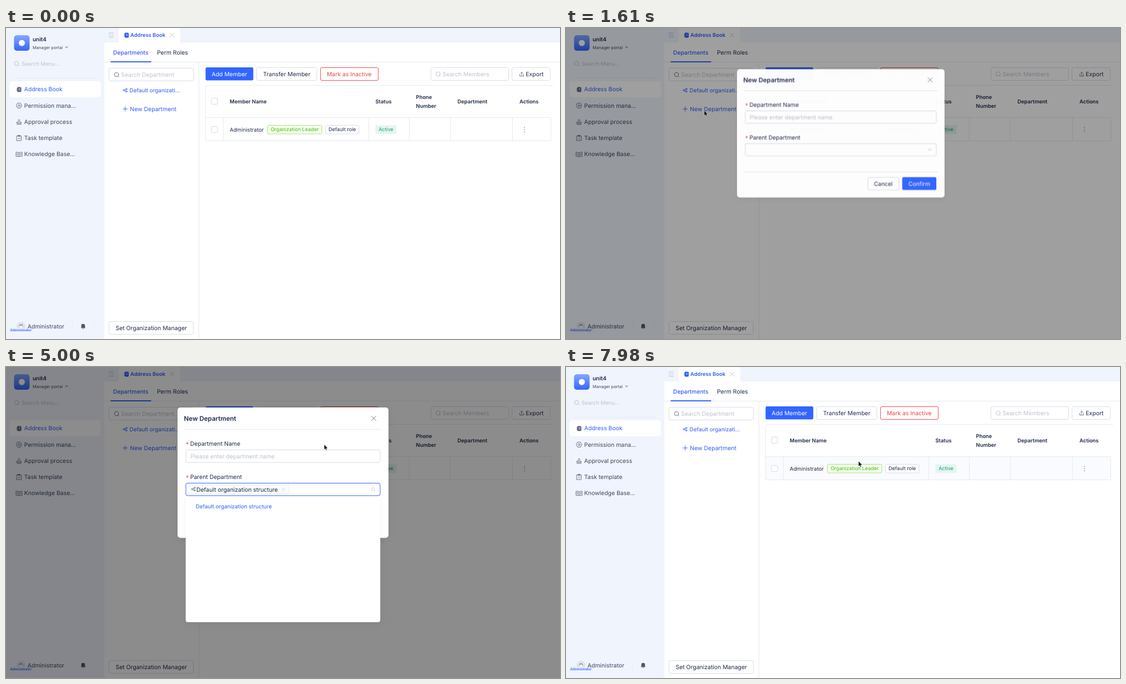
Recreate the animation shown at these times as an HTML page. Size 998x561 px, loop 8 s.

```html
<!DOCTYPE html>
<html lang="en">
<head>
<meta charset="utf-8">
<title>New department</title>
<style>
html, body { margin: 0; width: 100%; height: 100%; overflow: hidden; background: #fff; }
svg { display: block; }
text { font: 10.45px Inter, "Open Sans", sans-serif; fill: #1f2a4a; text-rendering: geometricPrecision; white-space: pre; }
.head { font-size: 9.4px; font-weight: 600; }
.small { font-size: 9.05px; }
.nav { fill: #3c4763; }
.hint { fill: #bcc2d0; }
.blue { fill: #2e5bff; }
.box { fill: #fff; stroke: #d9dde8; }
.rule { fill: none; stroke: #e7eaf1; }
.icon { fill: none; stroke: #5d677f; stroke-width: .9; stroke-linecap: round; stroke-linejoin: round; }
.icon.pale { stroke: #b4bbca; }
.icon.lit { stroke: #2e5bff; }
.star { fill: #f5403c; }

/* One loop is 8 s, so 1% is 80 ms. */
.anim { animation: 8s linear infinite; }
.step { animation: 8s step-end infinite; }

#mask { animation-name: mask; }
@keyframes mask {
  0%, 18.05% { opacity: 0; }
  20.55%, 92.44% { opacity: .45; }
  94.94%, 100% { opacity: 0; }
}
#modal { animation-name: zoom; transform-origin: 249px 149px; }
@keyframes zoom {
  0% { opacity: 0; transform: scale(.2); }
  18.59% { opacity: 0; transform: scale(.2); animation-timing-function: cubic-bezier(.08,.82,.17,1); }
  21.09% { opacity: 1; transform: none; }
  92.44% { opacity: 1; transform: none; animation-timing-function: cubic-bezier(.78,.14,.15,.86); }
  94.94%, 100% { opacity: 0; transform: scale(.2); }
}
#drop { animation-name: drop; transform-origin: 324px 233px; }
@keyframes drop {
  0% { opacity: 0; transform: scaleY(.8); }
  41.6% { opacity: 0; transform: scaleY(.8); animation-timing-function: cubic-bezier(.23,1,.32,1); }
  43.4% { opacity: 1; transform: none; }
  64.75% { opacity: 1; transform: none; animation-timing-function: cubic-bezier(.755,.05,.855,.06); }
  67.1%, 100% { opacity: 0; transform: scaleY(.8); }
}
#link { animation-name: link; }
@keyframes link { 0% { fill: #2e5bff; } 15.5% { fill: #4b78ff; } 18.1% { fill: #2e5bff; } }
#name { animation-name: name; }
@keyframes name { 0% { stroke: #d9dde8; } 31.8% { stroke: #4070ff; } 40.3% { stroke: #d9dde8; } }
#parent { animation-name: parent; }
@keyframes parent {
  0%, 38.6% { stroke: #d9dde8; }
  40%, 44% { stroke: #7e9fff; }
  45.4%, 68.9% { stroke: #3366ff; }
  71%, 100% { stroke: #d9dde8; }
}
#chosen { animation-name: chosen; }
@keyframes chosen { 0% { opacity: 0; } 51.8% { opacity: 1; } 92.2% { opacity: 0; } }
#option { animation-name: option; }
@keyframes option { 0% { fill: #1f2a4a; } 51.8% { fill: #2e5bff; } }
#chevron { animation-name: chevron; }
@keyframes chevron { 0% { opacity: 1; } 42.8% { opacity: 0; } 67% { opacity: 1; } }
#lens { animation-name: lens; }
@keyframes lens { 0% { opacity: 0; } 42.8% { opacity: 1; } 67% { opacity: 0; } }
#confirm { animation-name: confirm; }
@keyframes confirm {
  0%, 73% { fill: #3366ff; }
  74.3%, 83.2% { fill: #668aff; }
  85%, 100% { fill: #3366ff; }
}
#row { animation-name: row; }
@keyframes row { 0% { fill: #fff; } 99.2% { fill: #f9fbfe; } }

#pointer { animation-name: move; }
@keyframes move {
  0% { transform: translate(676px, 572px); }
  2.3% { transform: translate(676px, 572px); animation-timing-function: ease-out; }
  9% { transform: translate(259px, 201px); }
  12% { transform: translate(259px, 201px); animation-timing-function: ease-in-out; }
  16.1% { transform: translate(249px, 149px); }
  20.4% { transform: translate(249px, 149px); animation-timing-function: ease-in-out; }
  24.1% { transform: translate(380px, 157px); }
  31.9% { transform: translate(380px, 157px); animation-timing-function: ease-in-out; }
  40.4% { transform: translate(395px, 222px); }
  47.6% { transform: translate(395px, 222px); animation-timing-function: ease-in-out; }
  51% { transform: translate(400px, 252px); }
  58.7% { transform: translate(400px, 252px); animation-timing-function: ease-in; }
  62.5% { transform: translate(573px, 140px); animation-timing-function: ease-out; }
  64.8% { transform: translate(590px, 123px); }
  68.7% { transform: translate(590px, 123px); animation-timing-function: ease-in-out; }
  74% { transform: translate(640px, 270px); }
  82.3% { transform: translate(640px, 270px); animation-timing-function: ease-in-out; }
  89.2% { transform: translate(666px, 91px); }
  96.4% { transform: translate(666px, 91px); animation-timing-function: ease-in; }
  97.75% { transform: translate(639px, 111px); }
  98.75% { transform: translate(574px, 151px); animation-timing-function: ease-out; }
  99.75%, 100% { transform: translate(527px, 170px); }
}
#arrow { animation-name: arrow; }
@keyframes arrow {
  0% { opacity: 1; } 15.5% { opacity: 0; } 18.6% { opacity: 1; } 23% { opacity: 0; }
  34.4% { opacity: 1; } 50% { opacity: 0; } 59.6% { opacity: 1; } 73.4% { opacity: 0; }
  83.4% { opacity: 1; } 88% { opacity: 0; } 92.4% { opacity: 1; }
}
#hand { animation-name: hand; }
@keyframes hand {
  0% { opacity: 0; } 15.5% { opacity: 1; } 18.6% { opacity: 0; } 50% { opacity: 1; }
  59.6% { opacity: 0; } 73.4% { opacity: 1; } 83.4% { opacity: 0; } 88% { opacity: 1; } 92.4% { opacity: 0; }
}
#beam { animation-name: beam; }
@keyframes beam { 0% { opacity: 0; } 23% { opacity: 1; } 34.4% { opacity: 0; } }
</style>
</head>
<body>
<svg width="998" height="561" viewBox="0 0 998 561">
  <defs>
    <linearGradient id="tile" x2="0" y2="1"><stop stop-color="#86a6ff"/><stop offset="1" stop-color="#3566fb"/></linearGradient>
    <filter id="shade" x="-20%" y="-20%" width="140%" height="150%"><feDropShadow dx="0" dy="4" stdDeviation="6" flood-opacity=".06"/></filter>
    <g id="search"><circle r="3.7"/><path d="M2.7 2.7L4.3 4.3"/></g>
    <g id="cross"><path d="M-4-4L4 4M4-4L-4 4"/></g>
    <g id="book"><rect x="-2.8" y="-4" width="6.4" height="8" rx="1" fill="currentColor"/><path d="M-4-2h1.4M-4 0h1.4M-4 2h1.4"/><path d="M0-1.6h1.6M0 .6h1.6" stroke="#fff"/></g>
    <g id="share"><circle cx="-2.4" r="1.3"/><circle cx="2" cy="-2.2" r="1.3"/><circle cx="2" cy="2.2" r="1.3"/><path d="M-1.2-.6L.8-1.7M-1.2.6L.8 1.7"/></g>
    <rect id="check" width="11" height="11" rx="2" fill="#fff" stroke="#d5daea"/>
  </defs>

  <!-- Sidebar -->
  <rect width="177" height="561" fill="#f0f4fc"/>
  <rect x="14.5" y="13" width="28" height="28" rx="5" fill="url(#tile)"/>
  <circle cx="28.5" cy="27" r="5.5" fill="#fff"/>
  <text x="48" y="24" style="font-size:10px;font-weight:600">unit4</text>
  <text x="48" y="37.5" class="nav" style="font-size:7.5px">Manager portal</text>
  <path d="M106 33.5h6.4L109.2 37z" fill="#a3abbc"/>
  <use href="#search" x="19" y="64" class="icon pale"/>
  <text x="28" y="68" class="hint" style="font-size:9.6px">Search Menu...</text>
  <path d="M14 90.5H163" class="rule"/>
  <rect x="6" y="96" width="165" height="29" rx="5" fill="#fff"/>
  <use href="#book" x="23.5" y="111" class="icon" color="#5d677f"/>
  <text x="32.8" y="114.3" class="blue">Address Book</text>
  <g class="icon" transform="translate(23.5 140)"><path d="M-2.5-4.5h5L5 0 2.5 4.5h-5L-5 0z"/><circle r="1.8"/></g>
  <text x="32.8" y="143.6" class="nav">Permission mana...</text>
  <g class="icon" transform="translate(23.5 169)"><path d="M-1.2 1V-1C-3-4.8 3-4.8 1.2-1V1H4v2H-4V1zM-4 4.8h8"/></g>
  <text x="32.8" y="172.8" class="nav">Approval process</text>
  <g class="icon" transform="translate(23.5 198.5)"><path d="M-4-3.8h8v8.4h-8zM-1.5-5h3v2h-3zM-1.8.6L-.3 2 2-.8"/></g>
  <text x="32.8" y="202" class="nav">Task template</text>
  <g class="icon" transform="translate(23.5 228)"><path d="M0-3Q-2-4.2-5.5-4V3.6H-1L0 4.4 1 3.6H5.5V-4Q2-4.2 0-3V4M-3.8-1.2h2M-3.8.8h2M1.8-1.2h2M1.8.8h2"/></g>
  <text x="32.8" y="231.2" class="nav">Knowledge Base...</text>
  <circle cx="27" cy="538" r="8" fill="#dfe3ea"/>
  <path d="M23.5 538.5q.3-4 3.5-4t3.5 4l-1.5-1.3h-4z" fill="#7e8695"/>
  <circle cx="27" cy="538.6" r="2.4" fill="#f5f5f7"/>
  <rect x="6" y="541" width="42" height="7" rx="3" fill="#e3eaff"/>
  <text x="7.8" y="546.7" class="blue" style="font-size:5.9px;font-weight:500">Administrator</text>
  <text x="38.8" y="541.6" class="nav">Administrator</text>
  <path d="M119.5 532v12M158.5 532v12" class="rule"/>
  <path d="M134.8 541.3l.9-1.4v-2.8a3.3 3.3 0 0 1 6.6 0v2.8l.9 1.4zM137.6 542h2.8q-1.4 1.8-2.8 0z" fill="#4c5671"/>

  <!-- Tab strip -->
  <rect x="177" width="821" height="26" fill="#f0f4fc"/>
  <path d="M203 26V4q0-4 4-4H310q4 0 4 4V26z" fill="#fff"/>
  <path d="M185.5 9h8M189.5 12.8h4M185.5 16.6h8M187.2 11.2l-1.8 1.6 1.8 1.6" class="icon pale"/>
  <use href="#book" x="217" y="13" class="icon lit" color="#2e5bff"/>
  <text x="224" y="16.4" class="head blue">Address Book</text>
  <use href="#cross" transform="translate(299.3 12.8) scale(.9)" class="icon pale"/>
  <path d="M177 61.5H998M347.5 62V561" class="rule"/>
  <text x="193" y="47.8" class="blue" style="font-size:10.25px;font-weight:500">Departments</text>
  <rect x="188.5" y="60" width="73" height="2" fill="#3366ff"/>
  <text x="272" y="47.8">Perm Roles</text>

  <!-- Department column -->
  <rect x="185.5" y="72.5" width="152" height="23" rx="3" class="box"/>
  <use href="#search" x="199" y="84" class="icon"/>
  <text x="207.2" y="87.9" class="hint">Search Department</text>
  <use href="#share" x="214.7" y="112.3" class="icon lit"/>
  <text x="222.5" y="115.8" class="blue" style="font-size:9.9px">Default organizati...</text>
  <path d="M210.7 146h8M214.7 142v8" class="icon lit"/>
  <text id="link" x="223.3" y="149.8" class="step">New Department</text>
  <rect x="185.5" y="529.5" width="152" height="23" rx="3" class="box"/>
  <text x="261.7" y="544.5" text-anchor="middle">Set Organization Manager</text>

  <!-- Toolbar -->
  <rect x="359.5" y="71" width="86" height="23.5" rx="2.5" fill="#3366ff"/>
  <text x="402.5" y="86.6" text-anchor="middle" style="fill:#fff">Add Member</text>
  <rect x="451.5" y="71.5" width="108.5" height="23" rx="2.5" class="box"/>
  <text x="505.8" y="86.6" text-anchor="middle">Transfer Member</text>
  <rect x="566.5" y="71.5" width="104" height="23" rx="2.5" fill="#fff" stroke="#f5504d"/>
  <text x="618.3" y="86.6" text-anchor="middle" style="fill:#f04542">Mark as Inactive</text>
  <rect x="765.5" y="71.5" width="140" height="23" rx="3" class="box"/>
  <use href="#search" x="778.3" y="83" class="icon pale"/>
  <text x="786.3" y="86.6" class="hint">Search Members</text>
  <rect x="911.5" y="71.5" width="69" height="23" rx="3" class="box"/>
  <path d="M925.6 83.6v3.2h6.8v-3.2M929 85v-5.2M927.2 81.4l1.8-1.8 1.8 1.8" class="icon"/>
  <text x="936.3" y="86.6">Export</text>

  <!-- Member table -->
  <rect id="row" x="360" y="162" width="621" height="41" class="step"/>
  <path d="M359.5 203.5V107.5q0-4 4-4H982q3 0 4 2M359.5 161.5H981.5M359.5 203.5H981.5M391.5 162V203M653.5 162V203M726.5 162V203M800.5 162V203M912.5 162V203M981.5 162V203" class="rule"/>
  <use href="#check" x="370" y="126.5"/>
  <text class="head" y="136"><tspan x="403">Member Name</tspan><tspan x="665.5">Status</tspan><tspan x="813.3">Department</tspan><tspan x="925">Actions</tspan><tspan x="738.6" y="128.2">Phone</tspan><tspan x="738.6" y="144.4">Number</tspan></text>
  <use href="#check" x="370" y="177.5"/>
  <text x="403" y="186.6" style="font-size:9.7px">Administrator</text>
  <rect x="471" y="175.5" width="98" height="15.5" rx="2" fill="#f6ffed" stroke="#a8e37c"/>
  <text x="520" y="186.4" text-anchor="middle" class="small" style="fill:#49b814">Organization Leader</text>
  <rect x="575.5" y="175.5" width="60.5" height="15.5" rx="2" class="box"/>
  <text x="605.7" y="186.4" text-anchor="middle" class="small">Default role</text>
  <rect x="665.5" y="175.5" width="38" height="15.5" fill="#e5f5ef"/>
  <text x="684.5" y="186.4" text-anchor="middle" class="small" style="fill:#17a077">Active</text>
  <g fill="#8c94a6"><circle cx="934" cy="179.3" r=".9"/><circle cx="934" cy="183.3" r=".9"/><circle cx="934" cy="187.3" r=".9"/></g>

  <rect id="mask" class="anim" width="998" height="561" opacity="0"/>

  <!-- Dialog -->
  <g id="modal" class="anim" opacity="0">
    <rect x="309" y="73" width="380" height="235.3" rx="5" fill="#fff" filter="url(#shade)"/>
    <text x="320.6" y="96.5" style="font-size:11.5px;font-weight:600">New Department</text>
    <use href="#cross" x="662.5" y="92.6" class="icon"/>
    <path d="M321 112.5H677M321 261.5H677" class="rule"/>
    <text x="324" y="143" class="star">*</text>
    <text x="331.8" y="142">Department Name</text>
    <rect id="name" x="324" y="149.5" width="350" height="22.7" rx="3" class="box step"/>
    <text x="332.3" y="164.6" class="hint">Please enter department name</text>
    <text x="324" y="203" class="star">*</text>
    <text x="331.8" y="202">Parent Department</text>
    <rect id="parent" x="324" y="209.5" width="350" height="22.5" rx="3" class="box anim"/>
    <path id="chevron" d="M658.4 218.6l3.5 3.8 3.5-3.8" class="icon pale step"/>
    <use id="lens" href="#search" transform="translate(661.4 220.3) scale(.75)" class="icon pale step"/>
    <g id="chosen" class="step">
      <rect x="327.5" y="212.5" width="182" height="16.5" rx="2" fill="#fafbfd" stroke="#eceff5"/>
      <use href="#share" x="337.7" y="220.3" class="icon"/>
      <text x="343" y="224.5">Default organization structure</text>
      <use href="#cross" transform="translate(499.8 221.3) scale(.6)" class="icon pale"/>
    </g>
    <rect x="548.5" y="271.5" width="57" height="23" rx="2.5" class="box"/>
    <text x="576.8" y="286.7" text-anchor="middle">Cancel</text>
    <rect id="confirm" class="anim" x="611.5" y="271" width="62.5" height="23.5" rx="2.5"/>
    <text x="642.7" y="286.7" text-anchor="middle" style="fill:#fff">Confirm</text>
  </g>

  <g id="drop" class="anim" opacity="0">
    <rect x="323.7" y="235" width="350.5" height="225.3" rx="4" fill="#fff" filter="url(#shade)"/>
    <text id="option" class="step" x="341.8" y="254.6" style="font-size:9.75px">Default organization structure</text>
  </g>

  <g id="pointer" class="anim">
    <path id="arrow" class="step" d="M0 0V9.2L2.1 7.3 3.5 10.5 5 9.8 3.7 6.8H6.6z" stroke="#fff" stroke-width=".5"/>
    <path id="hand" class="step" d="M-1.2.8C-1.2-.3.8-.3.8.8V4l3.6.8q1.2.4 1 1.8L4.7 10.6H-.4L-3.6 6.6C-4.2 5.6-3 5-2.3 5.7L-1.2 6.8zM2 4.4v1.2M3.6 4.8v1.2" fill="#fff" stroke="#000" stroke-width=".9" stroke-linejoin="round"/>
    <path id="beam" class="step" d="M-2.8-5Q-.4-5.2 0-3.9.4-5.2 2.8-5M0-3.9V3.9M-2.8 5Q-.4 5.2 0 3.9.4 5.2 2.8 5M-1.4 1.5h2.8" fill="none" stroke="#111" stroke-width="1.1"/>
  </g>
</svg>
</body>
</html>
```
